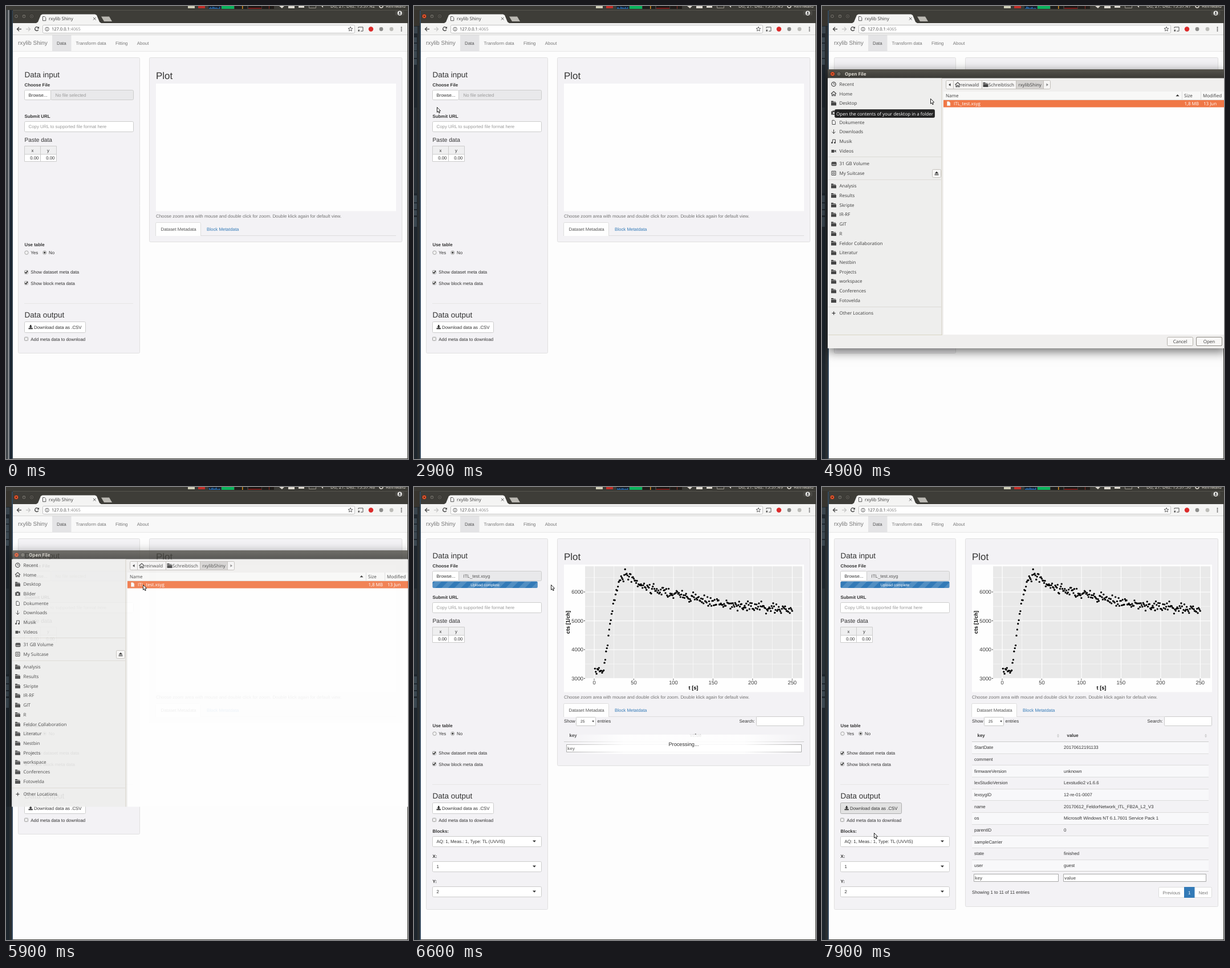
Animation of 705 by 794 pixels, one loop 8 s. Source, as an HTML page with a canvas:

```html
<!DOCTYPE html>
<html lang="en">
<head>
<meta charset="utf-8">
<title>rxylib Shiny</title>
<style>
html, body { margin: 0; width: 100%; height: 100%; overflow: hidden; background: #fdfdfd; }
canvas { display: block; }
</style>
</head>
<body>
<canvas id="stage" width="705" height="794"></canvas>
<script>
const LOOP = 8000, STEP = 100, W = 705, H = 794;
const PAGE = '"Liberation Sans", Arial, sans-serif';
const DESK = '"Open Sans", "Noto Sans", sans-serif';
const INK = '#333', WELL = '#f3f2f5', LINE = '#ddd', BLUE = '#337ab7';
const screen = document.getElementById('stage').getContext('2d');
let g = screen;

const clamp = v => Math.max(0, Math.min(1, v));
const mix = (a, b, p) => a + (b - a) * p;
const smooth = p => p * p * (3 - 2 * p);

function random(seed) {
  return () => {
    seed = (seed * 1664525 + 1013904223) >>> 0;
    return seed / 4294967296;
  };
}

function rect(x, y, w, h, fill) {
  g.fillStyle = fill;
  g.fillRect(x, y, w, h);
}

function box(x, y, w, h, fill, stroke, r = 0) {
  g.beginPath();
  g.roundRect(x + .5, y + .5, w - 1, h - 1, r);
  if (fill) { g.fillStyle = fill; g.fill(); }
  if (stroke) { g.strokeStyle = stroke; g.lineWidth = 1; g.stroke(); }
}

function poly(points, fill, stroke, width = 1) {
  g.beginPath();
  points.forEach(([x, y], i) => i ? g.lineTo(x, y) : g.moveTo(x, y));
  if (fill) { g.closePath(); g.fillStyle = fill; g.fill(); }
  if (stroke) { g.strokeStyle = stroke; g.lineWidth = width; g.stroke(); }
}

function disc(x, y, r, fill, stroke, width = 1) {
  g.beginPath();
  g.arc(x, y, r, 0, 7);
  if (fill) { g.fillStyle = fill; g.fill(); }
  if (stroke) { g.strokeStyle = stroke; g.lineWidth = width; g.stroke(); }
}

function write(s, x, y, size, color, family, weight, align) {
  g.font = `${weight} ${size}px ${family}`;
  g.textRendering = 'geometricPrecision';
  g.textAlign = align;
  g.fillStyle = color;
  g.fillText(s, x, y);
}
const text = (s, x, y, { size = 7.88, color = INK, weight = 400, align = 'left' } = {}) =>
  write(s, x, y, size, color, PAGE, weight, align);
const label = (s, x, y, { size = 8, color = '#3c3c3c', weight = 400, align = 'left' } = {}) =>
  write(s, x, y, size, color, DESK, weight, align);

// ---- desktop and browser frame ----

function topPanel(t) {
  rect(0, 0, W, 7, '#3b3a35');
  rect(319, 0, 12, 4, '#cfceb8');
  rect(337, 0, 12, 4, '#c2302a');
  rect(355, 0, 22, 5, '#15202c');
  const rnd = random(Math.floor((t + 400) / 500) * 977 + 5);
  for (let x = 356; x < 376; x += 2) {
    const h = 1 + rnd() * 3;
    rect(x, 5 - h, 1.4, h, '#2878c8');
  }
  rect(378, 0, 22, 5, '#0bb45c');
  rect(401, 0, 22, 5, '#1c1c1a');
  rect(414, 0, 1.5, 5, '#d89020');
  rect(425, 0, 23, 5, '#1a1614');
  rect(425, 3.5, 23, 1, '#d01818');
  rect(449, 0, 21, 5, '#201b18');
  rect(461, 0, 1, 5, '#8a2a20');
  const pale = '#dfdbd2';
  poly([[479, 0], [488, 0], [484, 4]], pale);
  rect(495, 0, 11, 4, pale);
  rect(513, 0, 10, 3, pale);
  box(531, -4, 13, 8, null, '#99958c');
  poly([[550, 0], [553, 0], [556, 3], [556, 0]], pale);
  const sec = Math.floor(42.9 + t / 1000);
  label('Do, 21. Dez. 15:37:' + sec, 569, 3, { color: pale, size: 8 });
  disc(658, 0, 3, null, pale, 1.5);
  label('Reinwald', 666, 3, { color: pale, size: 8.2 });
}

function backdrop(t) {
  rect(0, 0, 13, H, '#1e262d');
  rect(0, 7, 11, 28, '#37342e');
  rect(0, 36, 6, 12, '#38434c');
  [[55, 9], [66, 12], [79, 12], [93, 10], [332, 12], [346, 10], [358, 9], [370, 17]]
    .forEach(([y, h]) => rect(0, y, 5, h, '#3a4750'));
  rect(0, 178, 5, 150, '#262f36');
  rect(6, 36, 4, H, '#2a2e30');
  rect(10, 8, 2, H, '#34495c');
  const a = 1 - clamp((t - 100) / 500);
  if (a > 0) {
    g.globalAlpha = a;
    rect(0, 7, 11, H, '#22282d');
    rect(1.5, 7, 1, H, '#8d9194');
    rect(4, 7, 1.5, H, '#c4c6c7');
    rect(6, 36, 4, H, '#1e2a36');
    g.globalAlpha = 1;
  }
}

function closeButton(x, y, on) {
  disc(x, y, 4, on ? '#e4572e' : '#5d5b55', '#2c2b27', .8);
  const c = on ? '#5a1c0c' : '#33322e';
  poly([[x - 1.5, y - 1.5], [x + 1.5, y + 1.5]], null, c);
  poly([[x - 1.5, y + 1.5], [x + 1.5, y - 1.5]], null, c);
}

function frame(focused) {
  rect(12, 7, 693, 25, '#3e3d38');
  rect(12, 7, 693, 1, '#56544d');
  closeButton(18, 18, focused);
  disc(31.5, 18, 4, '#5d5b55', '#2c2b27', .8);
  disc(45, 18, 4, '#5d5b55', '#2c2b27', .8);
  rect(30, 18, 3, 1, '#33322e');
  box(43, 16, 4, 4, null, '#33322e');
  poly([[53, 30], [56, 28], [61, 16], [64, 14.5], [156, 14.5], [159, 16], [164, 28], [167, 30]], '#f4f4f3');
  poly([[167, 18.5], [181, 18.5], [186, 27], [172, 27]], '#bab8b2');
  docIcon(67, 22, '#555');
  label('rxylib Shiny', 75, 25);
  poly([[153, 20], [157.5, 24.5]], null, '#555');
  poly([[157.5, 20], [153, 24.5]], null, '#555');
  box(682, 8, 17, 9, '#4b4a45', null, 2);
  disc(690.5, 12.5, 3.9, '#f0f0ee');
  disc(690.5, 11.4, 1.3, '#333');
  rect(688.7, 13.4, 3.6, 1.5, '#333');

  rect(12, 30, 692, 21, '#f4f4f3');
  rect(12, 50, 692, 1, '#d4d4d4');
  arrow(23, 1, '#444');
  arrow(39, -1, '#c4c4c4');
  g.beginPath();
  g.arc(54, 40, 3.2, .5, 5.6);
  g.strokeStyle = '#444'; g.lineWidth = 1.3; g.stroke();
  poly([[54.5, 39.5], [58, 39.5], [58, 36]], '#444');
  box(64, 33, 548, 15, '#fff', '#c2c2c2', 2);
  disc(72, 40.5, 3.3, null, '#666');
  rect(71.5, 39.8, 1, 2.6, '#666');
  rect(71.5, 38.3, 1, 1, '#666');
  label('127.0.0.1', 80, 43.3, { size: 7.5 });
  label(':4065', 111.7, 43.3, { size: 7.5, color: '#8a8a8a' });
  const star = [];
  for (let i = 0; i <= 10; i++) {
    const r = i % 2 ? 1.8 : 4.2, a = i * Math.PI / 5;
    star.push([604 + r * Math.sin(a), 40.5 - r * Math.cos(a)]);
  }
  poly(star, null, '#555', .9);
  poly([[618, 39], [618, 37], [626, 37], [626, 44], [622, 44]], null, '#555');
  rect(617.5, 41.5, 2.5, 3, '#555');
  disc(640, 40.5, 4.2, '#dc2a2a');
  disc(658, 40.5, 3.4, '#8c8c8a');
  disc(676, 40.5, 3.4, '#bcbcb8');
  for (let i = -1; i < 2; i++) disc(693.5, 40.5 + i * 3, 1, '#444');

  rect(12, 51, 692, H, '#fdfdfd');
  rect(704, 7, 1, H, '#3a3934');
  rect(12, 793, 693, 1, '#3a3934');
}

function arrow(x, d, c) {
  poly([[x + 4 * d, 40.5], [x - 3.5 * d, 40.5]], null, c, 1.3);
  poly([[x, 37], [x - 3.5 * d, 40.5], [x, 44]], null, c, 1.3);
}

// ---- icons ----

function docIcon(x, y, c) {
  poly([[x - 2.5, y - 3.5], [x + .7, y - 3.5], [x + 2.8, y - 1.4], [x + 2.8, y + 3.7], [x - 2.5, y + 3.7], [x - 2.5, y - 3.5]], '#fff', c);
}

function folderIcon(x, y) {
  rect(x - 4.5, y - 4, 4, 2, '#454545');
  rect(x - 4.5, y - 2.8, 8, 1, '#454545');
  rect(x - 4.5, y - 1.2, 9, 5.2, '#454545');
}

function homeIcon(x, y) {
  poly([[x - 4.5, y], [x, y - 4], [x + 4.5, y]], null, '#454545', 1.2);
  poly([[x - 3, y - .5], [x - 3, y + 3.6], [x - 1, y + 3.6], [x - 1, y + 1], [x + 1, y + 1], [x + 1, y + 3.6], [x + 3, y + 3.6], [x + 3, y - .5]], null, '#454545', 1.1);
}

const icons = {
  clock(x, y) { disc(x, y, 3.7, null, '#454545', 1.2); poly([[x, y - 2], [x, y], [x + 2, y]], null, '#454545'); },
  home: homeIcon,
  folder: folderIcon,
  camera(x, y) { rect(x - 4.3, y - 2.6, 8.6, 6, '#454545'); rect(x - 2, y - 3.8, 4, 2, '#454545'); disc(x, y + .4, 1.6, '#eee'); },
  doc(x, y) { docIcon(x, y, '#454545'); },
  down(x, y) { poly([[x, y - 4], [x, y + 3]], null, '#454545'); poly([[x - 3, y], [x, y + 3], [x + 3, y]], null, '#454545'); },
  note(x, y) { poly([[x - 2, y + 2], [x - 2, y - 3], [x + 3, y - 3], [x + 3, y + 2]], null, '#454545'); disc(x - 3, y + 2.4, 1.5, '#454545'); disc(x + 2, y + 2.4, 1.5, '#454545'); },
  video(x, y) { rect(x - 4, y - 2, 5, 5, '#454545'); poly([[x + 1, y], [x + 4, y - 2], [x + 4, y + 3]], '#454545'); },
  drive(x, y) { box(x - 4, y - 3, 9, 7, '#454545', '#454545', 1); rect(x - 3, y + 1, 7, 1, '#ddd'); },
  disk(x, y) { box(x - 4, y - 4, 8, 8, null, '#454545'); disc(x, y, 1.6, null, '#454545'); },
  plus(x, y) { rect(x - 3, y - .6, 6, 1.3, '#454545'); rect(x - .6, y - 3, 1.3, 6, '#454545'); }
};

// ---- web page ----

function well(x, y, w, h) { box(x, y, w, h, WELL, '#e0e0e0', 2); }

function tick(x, y, on) {
  box(x, y, 7, 7, '#ececec', '#a0a0a0', 1);
  if (on) poly([[x + 1.4, y + 3.4], [x + 3, y + 5.2], [x + 5.8, y + 1.5]], null, '#222', 1.4);
}

function radio(x, y, on) {
  disc(x, y, 3.2, '#f0f0f0', '#a0a0a0', .9);
  if (on) disc(x, y, 1.7, '#444');
}

function dropdown(name, value, y) {
  text(name, 32.5, y, { weight: 700 });
  box(32, y + 6, 192, 19, '#fff', '#ccc', 2);
  text(value, 39.5, y + 18);
  poly([[208, y + 13.5], [214, y + 13.5], [211, y + 16.8]], INK);
}

function navbar() {
  rect(12, 51, 692, 28, '#f8f8f8');
  rect(12, 79, 692, 1, '#e7e7e7');
  text('rxylib Shiny', 21, 68, { size: 10.13, color: '#777' });
  rect(81, 51, 33.5, 28, '#e4e4e6');
  text('Data', 89, 67.5, { color: '#555' });
  text('Transform data', 122.5, 67.5, { color: '#777' });
  text('Fitting', 192, 67.5, { color: '#777' });
  text('About', 229.8, 67.5, { color: '#777' });
}

function progress(t) {
  const p = clamp((t - 5950) / 800), w = 191 * (1 - (1 - p) ** 2);
  g.save();
  g.beginPath();
  g.roundRect(32.5, 165.5, w, 11.5, 2);
  g.clip();
  rect(32, 165, 192, 12, BLUE);
  const shift = (t * 22.5 / 2000) % 22.5;
  for (let x = 10 - shift; x < 250; x += 22.5)
    poly([[x, 177], [x + 11.3, 177], [x + 22.8, 165.5], [x + 11.5, 165.5]], 'rgba(255,255,255,.15)');
  if (w > 45) text('Upload complete', 32.5 + w / 2, 173.5, { size: 6.75, color: '#fff', align: 'center' });
  g.restore();
}

function sidebar(t, loaded) {
  well(21, 90, 214, loaded ? 651 : 519);
  text('Data input', 32.5, 124.5, { size: 13.5 });
  text('Choose File', 32.5, 141, { weight: 700 });
  box(78, 147, 146, 18, '#e9e9eb', '#ccc', 2);
  box(32, 147, 47, 18, t > 3050 && t < 3500 ? '#e6e6e6' : '#fff', '#ccc', 2);
  text('Browse...', 39.5, 159);
  const sent = t >= 5950;
  text(sent ? 'ITL_test.xsyg' : 'No file selected', 86.5, 159, { color: sent ? '#555' : '#999' });
  if (sent) progress(t);
  text('Submit URL', 32.5, 196.3, { weight: 700 });
  box(32, 202, 192, 19, '#fff', '#ccc', 2);
  text('Copy URL to supported file format here', 39.5, 214.3, { color: '#999' });
  text('Paste data', 32.5, 237.5, { size: 10.13 });
  box(32, 245, 57, 28, '#fff', '#ccc');
  rect(33, 246, 55, 14, '#efeff0');
  rect(33, 259.5, 55, 1, '#ccc');
  rect(60, 246, 1, 26, '#ccc');
  text('x', 46.5, 256, { align: 'center' });
  text('y', 74, 256, { align: 'center' });
  text('0.00', 57.5, 269, { align: 'right' });
  text('0.00', 85.5, 269, { align: 'right' });
  text('Use table', 32.5, 421, { weight: 700 });
  radio(36, 432.3, false);
  text('Yes', 43.3, 435);
  radio(67.7, 432.3, true);
  text('No', 75, 435);
  tick(32, 463, true);
  text('Show dataset meta data', 43.3, 469);
  tick(32, 482, true);
  text('Show block meta data', 43.3, 488.5);
  rect(32, 521, 191, 1, '#e6e6e6');
  text('Data output', 32.5, 545.5, { size: 13.5 });
  const hover = t > 7600;
  box(32, 553, 108, 20, hover ? '#e2e2e2' : '#fff', hover ? '#adadad' : '#ccc', 2);
  rect(42, 559, 2.4, 3, INK);
  poly([[40.2, 561.7], [46.2, 561.7], [43.2, 564.6]], INK);
  rect(39.5, 564.3, 7.4, 2, INK);
  text('Download data as .CSV', 49, 566);
  tick(32, 580, false);
  text('Add meta data to download', 43.3, 586.7);
  if (loaded) {
    dropdown('Blocks:', 'AQ: 1, Meas.: 1, Type: TL (UVVIS)', 606);
    dropdown('X:', '1', 650);
    dropdown('Y:', '2', 694);
  }
}

// Rise, peak and slow decay of the curve as [t, counts]
const curve = [[1, 3270], [11, 3230], [13, 3440], [15, 3880], [17, 4250], [19, 4640], [22, 5200], [25, 5700],
  [28, 6070], [32, 6380], [36, 6540], [41, 6630], [46, 6550], [54, 6330], [65, 6180], [100, 5930],
  [130, 5790], [160, 5570], [200, 5490], [250, 5330]];
const sx = v => 316 + v * 1.389;
const sy = v => 335.5 - (v - 3000) * .0505;

function plot() {
  rect(300, 139, 381, 197, '#e9e9e9');
  for (let v = 0; v <= 250; v += 25) rect(sx(v) - .4, 139, v % 50 ? .5 : 1.1, 197, '#fff');
  for (let v = 3000; v <= 6500; v += 500) rect(300, sy(v) - .4, 381, v % 1000 ? .5 : 1.1, '#fff');
  const rnd = random(41);
  let k = 0;
  for (let t = 1; t <= 250; t++) {
    while (k < curve.length - 2 && t > curve[k + 1][0]) k++;
    const [t0, a] = curve[k], [t1, b] = curve[k + 1];
    const noise = (rnd() + rnd() + rnd() - 1.5) * (t < 35 ? 110 : 175);
    disc(sx(t), sy(mix(a, b, (t - t0) / (t1 - t0)) + noise), 1.65, '#000');
  }
  const tickText = { size: 9.3, color: '#3c3c3c' };
  for (let v = 3000; v <= 6000; v += 1000) {
    text(v, 297, sy(v) + 3.3, { ...tickText, align: 'right' });
    rect(298, sy(v) - .5, 2, 1, '#444');
  }
  for (let v = 0; v <= 250; v += 50) {
    text(v, sx(v), 345.5, { ...tickText, align: 'center' });
    rect(sx(v) - .5, 336, 1, 2, '#444');
  }
  const title = { size: 9.2, color: '#000', weight: 700, align: 'center' };
  text('t [s]', 490, 355, title);
  g.save();
  g.translate(273, 237);
  g.rotate(-Math.PI / 2);
  text('cts [1/ch]', 0, 0, title);
  g.restore();
}

const rows = [
  ['StartDate', '20170612191133'], ['comment', ''], ['firmwareVersion', 'unknown'],
  ['lexStudioVersion', 'Lexstudio2 v1.6.6'], ['lexsygID', '12-re-01-0007'],
  ['name', '20170612_FeldorNetwork_ITL_FB2A_L2_V3'],
  ['os', 'Microsoft Windows NT 6.1.7601 Service Pack 1'], ['parentID', '0'],
  ['sampleCarrier', ''], ['state', 'finished'], ['user', 'guest']
];

function sortMark(x, y) {
  poly([[x - 2, y - .6], [x + 2, y - .6], [x, y - 3.2]], '#ccc');
  poly([[x - 2, y + .6], [x + 2, y + .6], [x, y + 3.2]], '#ccc');
}

function field(name, x, y, w) {
  box(x, y, w, 14, '#fff', '#a8a8a8');
  text(name, x + 2, y + 9.8, { color: '#757575', weight: 700 });
}

function table(ready) {
  text('Show', 263, 413);
  box(284, 403, 35, 16, '#fff', '#c8c8c8', 1);
  text('25', 292, 413.3, { size: 6.6 });
  poly([[312.4, 409.5], [315.8, 409.5], [314.1, 412.5]], INK);
  text('entries', 321.5, 413);
  text('Search:', 570.5, 413);
  box(600, 402, 84, 17, '#fff', '#ccc', 1);
  text('key', 272.5, 438, { weight: 700 });
  rect(263, 446, ready ? 415 : 421, 1, '#ccc');
  if (!ready) {
    text('value', 484, 438, { weight: 700 });
    sortMark(492, 436);
    field('key', 267, 451, 413);
    const fade = g.createLinearGradient(263, 0, 684, 0);
    fade.addColorStop(0, 'rgba(255,255,255,0)');
    fade.addColorStop(.25, 'rgba(255,255,255,.9)');
    fade.addColorStop(.75, 'rgba(255,255,255,.9)');
    fade.addColorStop(1, 'rgba(255,255,255,0)');
    rect(263, 434, 421, 34, fade);
    text('Processing...', 473, 454, { size: 9.2, align: 'center' });
    return;
  }
  text('value', 429.5, 438, { weight: 700 });
  sortMark(414, 436);
  sortMark(673, 436);
  rows.forEach(([key, value], i) => {
    const y = 446.5 + i * 20.65;
    rect(263, y, 415, 20.65, i % 2 ? WELL : '#f8f8fa');
    rect(263, Math.floor(y), 415, 1, i ? LINE : '#ccc');
    text(key, 267, y + 12.8);
    text(value, 424, y + 12.8);
  });
  rect(263, 673, 415, 1, '#ccc');
  field('key', 266, 678, 149);
  field('value', 423, 678, 251);
  text('Showing 1 to 11 of 11 entries', 263, 713);
  box(590, 701, 94, 19, '#fff', LINE, 2);
  rect(635, 701, 18.5, 19, BLUE);
  text('Previous', 597.5, 713.5, { color: '#777' });
  text('1', 644.2, 713.5, { color: '#fff', align: 'center' });
  text('Next', 660.5, 713.5, { color: '#777' });
}

function mainPanel(t, loaded) {
  const ready = t >= 6850;
  well(251, 90, 444, ready ? 646 : loaded ? 399 : 324);
  text('Plot', 263, 128, { size: 16.9 });
  rect(263, 136, 421, 223.5, '#fefefe');
  if (loaded) plot();
  text('Choose zoom area with mouse and double click for zoom. Double klick again for default view.', 263, 370.7, { color: '#737373' });
  rect(263, 402, 421, 1, LINE);
  box(262, 379, 80, 27, '#fefefe', LINE, 2);
  rect(262, 403, 81, 4, WELL);
  text('Dataset Metadata', 271.5, 393.7, { color: '#555' });
  text('Block Metatdata', 352, 393.7, { color: BLUE });
  if (loaded) table(ready);
}

// ---- file chooser, painted once ----

const places = [
  [137, 'clock', 'Recent'], [153.7, 'home', 'Home'], [170.4, 'folder', 'Desktop'], [187.1, 'camera', 'Bilder'],
  [203.8, 'doc', 'Dokumente'], [220.5, 'down', 'Downloads'], [237.2, 'note', 'Musik'], [254, 'video', 'Videos'],
  [276.3, 'drive', '31 GB Volume'], [293, 'disk', 'My Suitcase'], [538.4, 'plus', 'Other Locations']
];
['Analysis', 'Results', 'Skripte', 'IR-RF', 'GIT', 'R', 'Feldor Collaboration', 'Literatur', 'Nestbin',
  'Projects', 'workspace', 'Conferences', 'Fotovelda'].forEach((s, i) => places.push([315.4 + i * 16.72, 'folder', s]));

function button(s, x, y, w, h, fill = '#f8f7f6') {
  box(x, y, w, h, fill, '#b5b2ac', 2);
  label(s, x + w / 2, y + h / 2 + 2.8, { align: 'center' });
}

function paintChooser() {
  g.save();
  g.shadowColor = 'rgba(0,0,0,.6)';
  g.shadowBlur = 18;
  g.shadowOffsetY = 5;
  rect(10, 111, 700, 489, '#f0efee');
  g.restore();
  const bar = g.createLinearGradient(0, 111, 0, 126);
  bar.addColorStop(0, '#55534c');
  bar.addColorStop(1, '#3c3b37');
  rect(10, 111, 700, 15.5, bar);
  closeButton(18.5, 119, true);
  disc(29.5, 119, 3.8, '#6a6860', '#2c2b27', .8);
  label('Open File', 40, 122, { color: '#dfdbd2', weight: 700 });
  rect(11, 126.5, 199, 450, '#eeeeed');
  rect(209.5, 126.5, 1, 450, '#d3d0c4');
  rect(11, 576, 200, 1, '#d9d6c4');
  [264, 304, 527].forEach(y => rect(11, y, 198, 1, '#dcdad6'));
  places.forEach(([y, icon, s]) => {
    icons[icon](20.5, y);
    label(s, 30.5, y + 2.8);
  });
  box(193, 286, 16, 15, '#f8f7f6', '#c5c2bd', 2);
  poly([[197.5, 293.8], [204.5, 293.8], [201, 290]], '#333');
  rect(197.5, 295, 7, 1.4, '#333');

  box(217, 130, 184, 16, '#f6f5f4', '#c2bfba', 2);
  rect(341, 131, 47, 14, '#d6d4d2');
  [230, 280, 340, 388].forEach(x => rect(x, 131, 1, 14, '#c2bfba'));
  poly([[225.5, 135.5], [225.5, 140.5], [222, 138]], '#333');
  poly([[393.5, 135.5], [393.5, 140.5], [397, 138]], '#888');
  homeIcon(238, 138);
  label('reinwald', 243, 140.8);
  folderIcon(287, 138);
  label('Schreibtisch', 292, 140.8);
  label('rxylibShiny', 364.5, 140.8, { align: 'center' });

  rect(213, 150, 492, 426, '#fefefe');
  rect(213, 150, 492, 14.5, '#f8f8f7');
  rect(213, 164, 492, 1, '#e0dedb');
  rect(631, 150, 1, 14, LINE);
  rect(664, 150, 1, 14, LINE);
  label('Name', 217, 160);
  label('Size', 635, 160);
  label('Modified', 668, 160);
  poly([[620.5, 158.3], [626.5, 158.3], [623.5, 155]], '#333');
  rect(213, 165, 492, 12.5, '#f07746');
  docIcon(222, 171, '#e8d0c4');
  label('ITL_test.xsyg', 231, 173.8, { color: '#fff' });
  label('1,8 MB', 661, 173.8, { color: '#fff', align: 'right' });
  label('13 Jun', 669, 173.8, { color: '#fff' });
  button('Cancel', 605, 580, 46, 16);
  button('Open', 656, 580, 46, 16);
  box(656, 580, 46, 16, null, '#8f8c86', 2);
}

const sheet = document.createElement('canvas');
sheet.width = W;
sheet.height = H;
g = sheet.getContext('2d');
paintChooser();
g = screen;

function chooser(t) {
  if (t < 3300 || t >= 6350) return;
  const out = clamp((t - 5850) / 350);
  if (!out) {
    g.globalAlpha = clamp((t - 3250) / 300);
    g.drawImage(sheet, 0, 0);
    g.globalAlpha = 1;
    return;
  }
  // Diagonal wipe towards the upper right while fading
  const tail = clamp((t - 6200) / 150);
  const alpha = mix(1, .38, out) * (1 - tail);
  const left = mix(-1000, 505, out) + tail * 200;
  const low = mix(620, 203, out);
  [[90, 126.5, alpha * alpha], [126.5, low, alpha]].forEach(([y0, y1, a]) => {
    const edge = y => left - 1.76 * (y - 105);
    g.save();
    g.beginPath();
    g.moveTo(edge(y0), y0);
    g.lineTo(edge(y1), y1);
    g.lineTo(W, y1);
    g.lineTo(W, y0);
    g.clip();
    g.globalAlpha = a;
    g.drawImage(sheet, 0, 0);
    g.restore();
  });
}

function tooltip(t) {
  const a = Math.min(clamp((t - 4550) / 150), 1 - clamp((t - 5050) / 150));
  if (a <= 0) return;
  g.globalAlpha = a;
  box(22, 181, 176, 15, 'rgba(20,20,20,.93)', '#3a3a3a', 2);
  label('Open the contents of your desktop in a folder', 110, 191.7, { color: '#fff', align: 'center' });
  g.globalAlpha = 1;
}

const path = [[2400, -12, 300], [2900, 40, 177], [3150, 56, 153], [3300, 56, 153], [3650, 52, 157], [4100, 52, 157],
  [4300, 66, 161], [4600, 66, 163], [4900, 190, 162], [5250, 240, 171], [7100, 240, 171], [7700, 95, 566],
  [7900, 91, 606], [8000, 90, 610]];

function pointer(t) {
  const i = path.findIndex(k => k[0] > t);
  if (i < 1) return;
  const [t0, x0, y0] = path[i - 1], [t1, x1, y1] = path[i];
  const p = smooth((t - t0) / (t1 - t0));
  g.save();
  g.translate(mix(x0, x1, p), mix(y0, y1, p));
  g.lineJoin = 'round';
  poly([[.5, .5], [.5, 9.3], [2.4, 7.6], [3.9, 10.8], [5.3, 10.1], [3.9, 7.1], [6.6, 6.8], [.5, .5]], '#fff', '#222', 1);
  g.restore();
}

function draw(t) {
  const focused = t >= 300 && (t < 3300 || t >= 5900);
  const loaded = t >= 6450;
  rect(0, 0, W, H, '#fdfdfd');
  backdrop(t);
  topPanel(t);
  frame(focused);
  navbar();
  sidebar(t, loaded);
  mainPanel(t, loaded);
  chooser(t);
  tooltip(t);
  pointer(t);
}

function tickFrame() {
  const t = performance.now() % LOOP;
  draw(t - t % STEP);
  requestAnimationFrame(tickFrame);
}
tickFrame();
</script>
</body>
</html>
```
